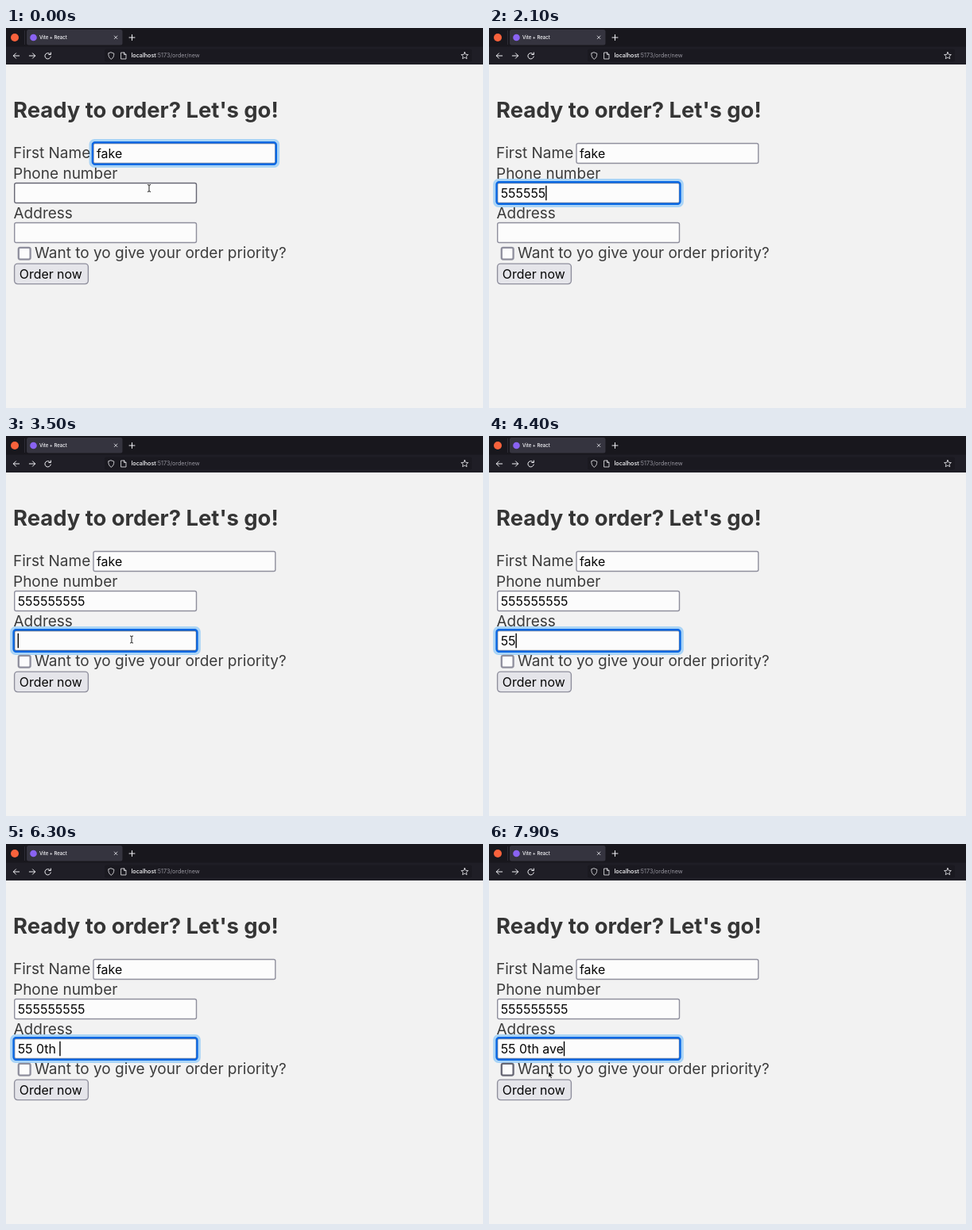
Animation of 600x479 px, one loop 8 s. Source, as an HTML page:

```html
<!DOCTYPE html>
<html lang="en">
<head>
<meta charset="utf-8">
<title>Order form</title>
<style>
html, body { margin: 0; width: 100%; height: 100%; overflow: hidden; background: #f2f2f2; }
svg { display: block; width: 600px; height: 479px; }
text { font-family: Inter, "Open Sans", sans-serif; font-optical-sizing: none; white-space: pre; }
.title { font-size: 27.4px; font-weight: 700; fill: #353535; }
.label { font-size: 19px; fill: #3c3c3c; }
.value { font-size: 15.9px; fill: #060606; }
.tab { font-size: 6px; font-weight: 500; fill: #fbfbfe; }
.url { font-size: 7.2px; fill: #97969f; }
.host { font-weight: 500; fill: #fbfbfe; }
.icon { fill: none; stroke: #f0f0f4; stroke-width: 1; stroke-linecap: round; stroke-linejoin: round; }
.halo { fill: none; stroke: #0090ff; stroke-opacity: .3; stroke-width: 3.2; }
.ring { fill: none; stroke: #0868e4; stroke-width: 2.4; }
</style>
</head>
<body>
<svg viewBox="0 0 600 479">
  <rect width="600" height="479" fill="#f2f2f2"/>

  <g id="browser">
    <rect width="600" height="46" fill="#1f1e26"/>
    <rect width="600" height="23.5" fill="#18171d"/>
    <path d="M23.5 3V21" stroke="#34333c" stroke-width=".8"/>
    <rect x="26" y="2" width="120.5" height="19.5" rx="2.5" fill="#35343f"/>
    <rect x="124" y="26.5" width="462" height="16" rx="2.5" fill="#1a1920"/>
    <circle cx="11" cy="12" r="5" fill="#f8623c"/>
    <circle cx="34.5" cy="12" r="4.3" fill="#8a63f2"/>
    <text class="tab" x="42" y="14.2">Vite + React</text>
    <text class="url" x="157.5" y="37.2"><tspan class="host">localhost</tspan>:5173/order/new</text>
    <g class="icon">
      <path d="M136.3 10l3.6 3.6m0-3.6l-3.6 3.6" stroke-width=".8"/>
      <path d="M155 12h7M158.5 8.5v7"/>
      <path d="M16.7 35H9.3m3.2-3.2L9.3 35l3.2 3.2"/>
      <path d="M29.3 35h7.4m-3.2-3.2l3.2 3.2-3.2 3.2"/>
      <path d="M55.6 33A3.7 3.7 0 1 0 56.3 36M56.4 31v2.5h-2.6"/>
      <path d="M132.3 30.8l3.5 1.3c0 3.6-1 5.8-3.5 7.2-2.5-1.4-3.5-3.6-3.5-7.2z" stroke-width=".8"/>
      <path d="M145 31h3.6l2.4 2.4v5.6h-6zM148.5 31v2.5h2.4" stroke-width=".8"/>
      <path id="star" stroke-width=".8"/>
    </g>
  </g>

  <text class="title" x="9" y="113.3">Ready to order? Let's go!</text>
  <text class="label" x="9" y="164">First Name</text>
  <text class="label" x="9" y="190">Phone number</text>
  <text class="label" x="9.5" y="240">Address</text>
  <text class="label" x="36" y="290.3">Want to yo give your order priority?</text>

  <g id="fields"></g>
  <rect id="check" x="15.8" y="276.8" width="14.8" height="14.8" rx="2" fill="#fcfcfc" stroke-width="2.3"/>
  <rect id="button" x="10.6" y="297.1" width="92.8" height="25.5" rx="4" stroke="#8f8f9d" stroke-width="1.4"/>
  <text class="value" x="16.8" y="316">Order now</text>

  <path id="caret" stroke="#000" stroke-width="1.4"/>
  <g id="mouse">
    <path id="arrow" d="M0 0V7.2L1.7 5.7 2.9 8.4 4.2 7.8 3 5.2H5.2Z" fill="#000" stroke="#fff" stroke-width=".5"/>
    <path id="beam" d="M-2-4.5Q0-4.5 0-3.2V3.2Q0 4.5-2 4.5M2-4.5Q0-4.5 0-3.2M0 3.2Q0 4.5 2 4.5" fill="none" stroke="#1f1f1f" stroke-width="1"/>
  </g>
</svg>
<script>
const LOOP = 8000, STEP = 100;
const NS = "http://www.w3.org/2000/svg";
const $ = id => document.getElementById(id);

function add(parent, tag, attrs) {
  const el = document.createElementNS(NS, tag);
  for (const k in attrs) el.setAttribute(k, attrs[k]);
  return parent.appendChild(el);
}

function makeField(x, y) {
  const g = add($("fields"), "g", { transform: `translate(${x} ${y})` });
  const box = add(g, "rect", { x: .7, y: .7, width: 228.8, height: 25, rx: 2,
    fill: "#fcfcfc", "stroke-width": 1.4 });
  const focus = add(g, "g", {});
  add(focus, "rect", { class: "halo", x: -3.2, y: -3.2, width: 236.4, height: 32.8, rx: 5 });
  add(focus, "rect", { class: "ring", x: -.5, y: -.5, width: 231, height: 27.4, rx: 3 });
  const text = add(g, "text", { class: "value", x: 4.7, y: 19 });
  return { x, y, box, focus, text };
}

const fields = [makeField(109.3, 144.8), makeField(10, 194.8), makeField(10, 244.8)];
const [first, phone, address] = fields;
first.text.textContent = "fake";

// Each key press time reveals one more character.
const phoneKeys = [500, 900, 1100, 1500, 1700, 1900, 2300, 2600, 2800];
const addressKeys = [4000, 4200, 5000, 5200, 5500, 5800, 6100, 6400, 6800, 6900];
const typed = (str, keys, t) => str.slice(0, keys.filter(k => k <= t).length);

const caretOff = [[0, 100], [4700, 5000], [5300, 5500], [7200, 7700]];
const mouseOff = [[500, 2900], [4000, 7300]];
const within = (spans, t) => spans.some(([a, b]) => t >= a && t < b);

const path = [
  [0, 180, 202], [2900, 179, 213], [3000, 172, 226], [3300, 158, 256.5],
  [7300, 158, 256.5], [7600, 92, 310], [7800, 75, 287], [8000, 75, 287]
];

function mouseAt(t) {
  const i = Math.max(1, path.findIndex(p => p[0] > t));
  const [t0, x0, y0] = path[i - 1], [t1, x1, y1] = path[i];
  const k = (t - t0) / (t1 - t0);
  return [x0 + (x1 - x0) * k, y0 + (y1 - y0) * k];
}

const inside = (mx, my, x, y, w, h) => mx >= x && mx <= x + w && my >= y && my <= y + h;
const show = (el, on) => el.setAttribute("visibility", on ? "visible" : "hidden");

function draw(t) {
  phone.text.textContent = typed("555555555", phoneKeys, t);
  address.text.textContent = typed("55 0th ave", addressKeys, t);

  const active = t < 100 ? first : t < 3400 ? phone : address;
  const [mx, my] = mouseAt(t);
  const mouseOn = !within(mouseOff, t);
  let overField = false;
  for (const f of fields) {
    const hover = mouseOn && inside(mx, my, f.x, f.y, 230, 26);
    overField = overField || hover;
    f.box.setAttribute("stroke", hover ? "#676774" : "#8f8f9d");
    show(f.focus, f === active);
  }

  const overCheck = mouseOn && inside(mx, my, 15, 275, 344, 18);
  const overButton = mouseOn && inside(mx, my, 10, 297, 94, 26);
  $("check").setAttribute("stroke", overCheck ? "#676774" : "#8f8f9d");
  $("button").setAttribute("fill", overButton ? "#d0d0d7" : "#e5e5ea");

  const cx = active.x + 5.3 + active.text.getComputedTextLength();
  $("caret").setAttribute("d", `M${cx} ${active.y + 4}v18.5`);
  show($("caret"), !within(caretOff, t));

  $("mouse").setAttribute("transform", `translate(${mx} ${my})`);
  show($("arrow"), mouseOn && !overField);
  show($("beam"), mouseOn && overField);
}

const starPoint = (_, i) => {
  const a = i * Math.PI / 5, r = i % 2 ? 2.1 : 4.6;
  return `${577 + r * Math.sin(a)} ${35 - r * Math.cos(a)}`;
};
$("star").setAttribute("d", "M" + Array.from({ length: 10 }, starPoint).join("L") + "Z");

const start = performance.now();
function tick() {
  const t = (performance.now() - start) % LOOP;
  draw(Math.floor(t / STEP) * STEP);
  requestAnimationFrame(tick);
}
tick();
</script>
</body>
</html>
```
